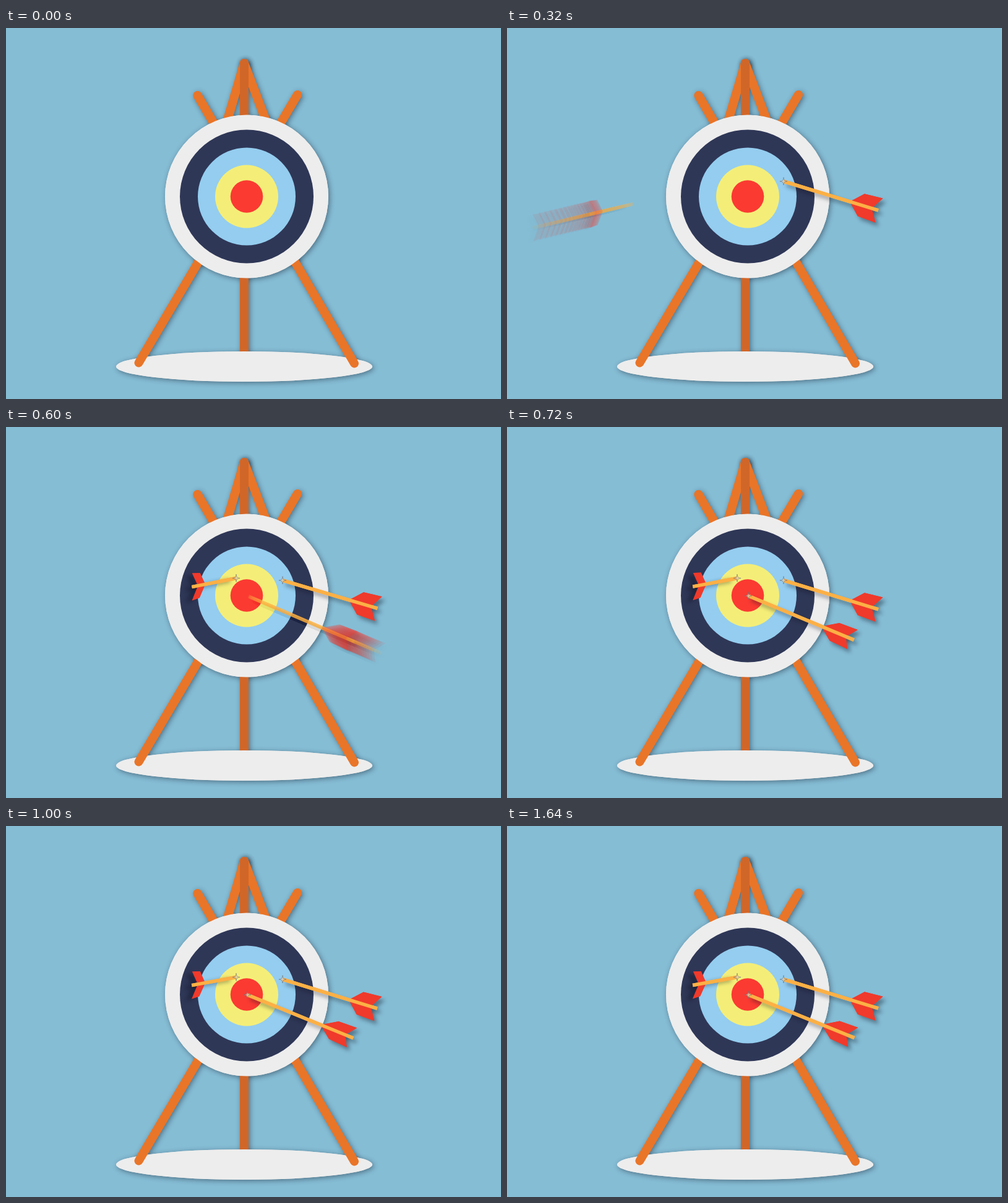
Write an HTML page with a canvas that moves like this. It is 800 by 600 pixels and loops after 1920 ms.

```html
<!DOCTYPE html>
<html lang="en">
<head>
<meta charset="utf-8">
<title>Archery target</title>
<style>
  html, body { margin: 0; width: 100%; height: 100%; overflow: hidden; background: #85bdd5; }
  canvas { display: block; }
</style>
</head>
<body>
<canvas id="stage" width="800" height="600"></canvas>
<script>
const ctx = document.getElementById('stage').getContext('2d');
const LOOP = 1920, STEP = 40, LAST_STEP = 1640;
const FLIGHT_SPEED = 4.3; // px per ms
const ORANGE = '#e97528', BROWN = '#d16629', PALE = '#ededed';

// Fletching: [front, middle, back, half width, notch, skew] along the shaft.
// Swing: degrees off the resting angle, t ms after impact.
const arrows = [
  { x: 447, y: 248, angle: 17, length: 160, land: 120, shadow: [5, 6],
    fletch: [112, 131, 161.5, 20.5, 149, 0],
    swing: t => 2.7 * Math.exp(-t / 320) * Math.cos(t * Math.PI / 400) },
  { x: 372, y: 244.5, angle: 169.8, length: 73, land: 360, shadow: [-10, 4],
    fletch: [51, 60, 72.5, 21.5, 63, -0.2],
    swing: t => -3.2 * Math.exp(-t / 200) },
  { x: 390, y: 273, angle: 22.1, length: 185, land: 600, shadow: [5, 6],
    fletch: [128, 151, 182.5, 17.5, 171, -0.1],
    swing: t => 1.1 * Math.exp(-t / 200) }
];

function setShadow(dx, dy, blur, alpha) {
  ctx.shadowColor = `rgba(10, 15, 30, ${alpha})`;
  ctx.shadowOffsetX = dx;
  ctx.shadowOffsetY = dy;
  ctx.shadowBlur = blur;
}

// Shadows first, then the clean shape, so parts do not shade each other.
function withShadow(shadow, draw) {
  setShadow(...shadow);
  draw();
  setShadow(0, 0, 0, 0);
  draw();
}

function line(x1, y1, x2, y2, color, width, cap = 'round') {
  ctx.beginPath();
  ctx.moveTo(x1, y1);
  ctx.lineTo(x2, y2);
  ctx.strokeStyle = color;
  ctx.lineWidth = width;
  ctx.lineCap = cap;
  ctx.stroke();
}

function ellipse(x, y, rx, ry, color) {
  ctx.beginPath();
  ctx.ellipse(x, y, rx, ry, 0, 0, Math.PI * 2);
  ctx.fillStyle = color;
  ctx.fill();
}

function drawStand() {
  line(385, 57, 345, 192, ORANGE, 14);
  line(385, 57, 436, 192, ORANGE, 14);
  line(385, 57, 385, 530, BROWN, 14);
  ellipse(385, 547.5, 207, 24.5, PALE);
  line(471, 108, 214.5, 541.5, ORANGE, 14);
  line(309.5, 109, 563, 542.5, ORANGE, 14);
  ellipse(389, 272.5, 132, 132, PALE);
}

function drawTarget() {
  ctx.fillStyle = '#85bdd5';
  ctx.fillRect(0, 0, 800, 600);
  withShadow([2, 2, 8, 0.45], drawStand);
  const rings = [[108, '#2f3757'], [79, '#94cdef'], [51, '#f4ee78'], [26.3, '#fb3a32']];
  for (const [radius, color] of rings) ellipse(389, 272.5, radius, radius, color);
}

function drawHole(x, y) {
  ctx.beginPath();
  ctx.moveTo(x, y - 6);
  for (const [dx, dy] of [[6, 0], [0, 6], [-6, 0], [0, -6]]) {
    ctx.quadraticCurveTo(x, y, x + dx, y + dy);
  }
  ctx.fillStyle = 'rgba(215, 205, 190, .6)';
  ctx.fill();
  ctx.strokeStyle = 'rgba(110, 110, 115, .75)';
  ctx.lineWidth = 0.8;
  ctx.stroke();
}

function drawBody({ length, fletch: [front, middle, back, half, notch, skew] }) {
  ctx.beginPath();
  ctx.moveTo(front, 0);
  ctx.lineTo(middle - skew * half, -half * 0.92);
  ctx.lineTo(back - skew * half, -half);
  ctx.lineTo(notch, 0);
  ctx.lineTo(back + skew * half, half);
  ctx.lineTo(middle + skew * half, half * 0.92);
  ctx.fillStyle = '#f03a2b';
  ctx.fill();
  line(0, 0, length, 0, '#fcb045', 5.5, 'butt');
}

// Streak of faint copies, denser towards the tip end.
function drawStreak(arrow, trail) {
  const copies = 20;
  ctx.globalAlpha = 0.09;
  setShadow(...arrow.shadow, 6, 0.12);
  for (let i = copies - 1; i >= 0; i--) {
    ctx.save();
    ctx.translate(trail * (i / copies) ** 2, 0);
    drawBody(arrow);
    ctx.restore();
  }
}

function drawArrow(arrow, time) {
  const t = time - arrow.land;
  if (t < -100) return;
  const settled = t >= 60;
  const shift = settled ? 0 : t < 0 ? -t * FLIGHT_SPEED : 2;

  ctx.save();
  ctx.translate(arrow.x, arrow.y);
  ctx.rotate((arrow.angle + arrow.swing(Math.max(t, 0))) * Math.PI / 180);
  ctx.translate(shift, 0);
  if (t <= 0) drawStreak(arrow, 55 - t * 1.25);
  else withShadow([...arrow.shadow, 6, 0.38], () => drawBody(arrow));
  ctx.restore();
  if (settled) drawHole(arrow.x, arrow.y);
}

function frame() {
  const elapsed = performance.now() % LOOP;
  const time = Math.min(Math.floor(elapsed / STEP) * STEP, LAST_STEP);
  drawTarget();
  for (const arrow of arrows) drawArrow(arrow, time);
  requestAnimationFrame(frame);
}
frame();
</script>
</body>
</html>
```
